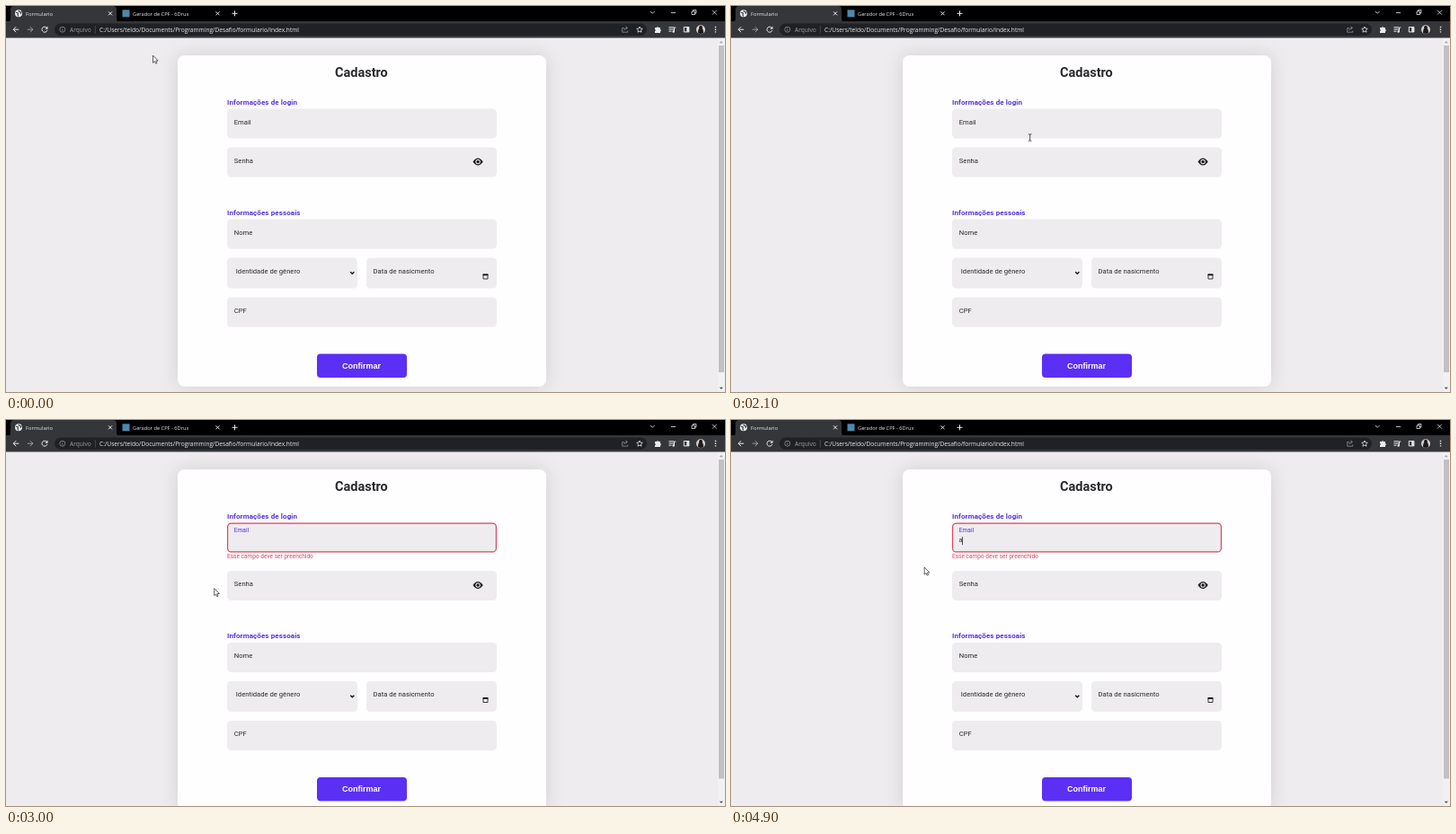
An HTML page for the animation above (5000 ms loop, 800 px wide and 430 px high).

```html
<!DOCTYPE html>
<html lang="pt">
<head>
<meta charset="utf-8">
<title>Formulario</title>
<style>
html, body { margin: 0; width: 100%; height: 100%; overflow: hidden; background: #eeecee }
svg { display: block; font: 7.65px Roboto, sans-serif; fill: #2b292d }
.field { fill: #eeecee }
.head { font-weight: 700; font-size: 8px; letter-spacing: .1px; fill: #5530e0 }
.ui { font-family: "Open Sans", sans-serif; fill: #e8eaed }
.line { fill: none; stroke: #e8eaed; stroke-width: 1 }
.thin { stroke-width: .8 }
.dim { fill: #9aa0a6 }
</style>
</head>
<body>
<svg width="800" height="430" viewBox="0 0 800 430">
  <filter id="shade" x="-20%" y="-20%" width="140%" height="140%">
    <feDropShadow dx="0" dy="0" stdDeviation="10" flood-color="#000" flood-opacity=".13"/>
  </filter>
  <rect width="800" height="430" fill="#eeecee"/>
  <rect id="card" x="191" y="55" width="410" height="369" rx="8" fill="#fefdff" filter="url(#shade)"/>
  <text x="366" y="79" font-size="14.5" font-weight="700">Cadastro</text>

  <text class="head" x="246" y="109.5">Informações de login</text>
  <rect class="field" x="246" y="114.5" width="300" height="33" rx="4.5"/>
  <rect id="border" x="246.6" y="115.1" width="298.8" height="31.8" rx="4" fill="none" stroke-width="1.2"/>
  <text id="email" x="253.8">Email</text>
  <text id="typed" x="253.8" y="136.3" font-family="Liberation Sans, Arial, sans-serif" font-size="6.7">a</text>
  <rect id="caret" y="130" width=".8" height="9"/>
  <text id="error" x="246" y="154.3" font-size="6.55" fill="#d8495d">Esse campo deve ser preenchido</text>

  <g id="rest">
    <rect class="field" x="246" y="157.5" width="300" height="33" rx="4.5"/>
    <text x="253.8" y="174.6">Senha</text>
    <path d="M519.5 173.5Q525 165.700 530.800 173.500Q525 181.300 519.500 173.500Z" fill="#1c1b1e"/>
    <circle cx="525.1" cy="173.500" r="2.700" fill="#eeecee"/>
    <circle cx="525.1" cy="173.500" r="1.700" fill="#1c1b1e"/>

    <text class="head" x="246" y="232.600">Informações pessoais</text>
    <rect class="field" x="246" y="237.500" width="300" height="33" rx="4.500"/>
    <text x="253.800" y="254.600">Nome</text>
    <rect class="field" x="246" y="280.500" width="145" height="34" rx="4.500"/>
    <text x="255.800" y="297.600">Identidade de gênero</text>
    <path d="M383.200 296.200l2.100 2.100 2.100-2.100" fill="none" stroke="#111" stroke-width="1.300"/>
    <rect class="field" x="401" y="280.500" width="145" height="34" rx="4.500"/>
    <text x="408.600" y="297.600">Data de nasicmento</text>
    <path d="M531 299.200h5v4.800h-5z" fill="none" stroke="#111" stroke-width=".8"/>
    <path d="M530.600 298.500h5.800v1.800h-5.800z" fill="#111"/>
    <rect class="field" x="246" y="324.500" width="300" height="33" rx="4.500"/>
    <text x="253.800" y="341.600">CPF</text>
    <rect x="346" y="387.500" width="100" height="26.500" rx="4" fill="#5b2ff4"/>
    <text x="374" y="403.800" font-family="Liberation Sans, Arial, sans-serif" font-size="9" font-weight="700" fill="#fff">Confirmar</text>
  </g>

  <rect x="792" y="35" width="8" height="395" fill="#f1f1f1"/>
  <rect id="thumb" x="793" y="44" width="6" fill="#c1c1c1"/>
  <path d="M793.700 41.200l2.100-2.200 2.100 2.200z" fill="#a3a3a3"/>
  <path d="M793.700 424.800l2.100 2.200 2.100-2.200z" fill="#505050"/>

  <g class="ui">
    <rect width="800" height="18" fill="#000"/>
    <rect y="17" width="800" height="18.500" fill="#35363a"/>
    <path d="M2 17.500Q5 17.500 5 14V4Q5 0 9 0H119Q123 0 123 4V14Q123 17.500 126 17.500Z" fill="#35363a"/>
    <rect x="54" y="19.500" width="659" height="13.500" rx="6.700" fill="#202124"/>

    <circle cx="14" cy="8.300" r="4"/>
    <path d="M11 7l2.500 1-.5 2 1 1.500M14 5l1 1.500 2 .3-1 2" fill="none" stroke="#35363a" stroke-width="1.100"/>
    <text x="22" y="10.600" font-size="5.850">Formulario</text>
    <rect x="129.500" y="4.300" width="8" height="8" fill="#4b8aad"/>
    <text x="141" y="10.600" font-size="5.700">Gerador de CPF - 6Drux</text>
    <path class="line" d="M114 6.300l4 4m0-4l-4 4M233.500 6.300l4 4m0-4l-4 4M254.500 5.300v6m-3-3h6"/>
    <path class="line thin" d="M717 6l2.300 2.300L721.600 6M740 7.500h5M763 6h3.500v3.500H763zM764.500 6V4.500h3.500V8h-1.500M786 4.800l4.800 4.800m0-4.800l-4.800 4.800"/>

    <path class="line" d="M14.300 26.200H8.200m3-3l-3 3 3 3"/>
    <path class="line" stroke-opacity=".55" d="M23.800 26.200h6m-3-3l3 3-3 3"/>
    <path class="line" d="M45.500 24.500a3 3 0 1 0 .4 2.500"/>
    <path d="M46.500 22.500v3.200h-3.200z"/>
    <g stroke="#9aa0a6" stroke-width=".7" fill="none">
      <circle cx="62.800" cy="26.200" r="3"/>
      <path d="M62.800 25.700v2.200m0-3.500v.7"/>
      <path d="M688 24.500h-2.300v4.700h6v-1.700M687.500 27.200q.5-2.600 3.500-2.800m-1.500-1.600l2 1.600-2 1.700"/>
    </g>
    <text class="dim" x="71" y="28.700" font-size="6.600">Arquivo</text>
    <path d="M99.300 22v8.500" stroke="#5f6368" stroke-width=".6"/>
    <text x="104" y="28.700" font-size="6.600">C:/Users/teldo/Documents/Programming/Desafio/formulario/index.html</text>

    <path class="line thin" d="M705 23l.95 2.100 2.300.2-1.700 1.600.5 2.300-2.050-1.200-2.050 1.200.5-2.300-1.700-1.600 2.300-.2z"/>
    <path d="M722 24h1.900a1.200 1.200 0 0 1 2.300 0h1.800v2a1.200 1.200 0 0 1 0 2.300v1.700h-6v-2a1.100 1.100 0 0 0 0-2.100z"/>
    <path class="line" d="M737.500 23.800h5.500M737.500 26h5.500M737.500 28.200h3M743.500 28.500v-4.500h1.800"/>
    <circle cx="742.700" cy="28.500" r="1.200"/>
    <path class="line" d="M754.300 23.500h5.600v5.400h-5.600z"/>
    <path d="M757.300 23.500h2.600v5.400h-2.600z"/>
    <circle cx="773" cy="26.200" r="5" fill="#d6cfcd"/>
    <path d="M770 30.100Q770 26 771.300 25a2 2 0 1 1 3.400 0Q776 26 776 30.100Q773 32 770 30.100Z" fill="#1d1a1c"/>
    <path d="M788.800 22.800h1.400v1.400h-1.400zM788.800 25.500h1.400v1.400h-1.400zM788.800 28.200h1.400v1.400h-1.400z"/>
  </g>

  <path id="arrow" d="M0 0V8.200L1.900 6.500 3.100 9.200 4.400 8.600 3.200 6H5.700Z" fill="#fff" stroke="#222" stroke-width=".7"/>
  <path id="beam" d="M-1.800-3.700H-.5L0-3.300.5-3.700H1.800M0-3.300V3.300M-1.800 3.700H-.5L0 3.300.5 3.700H1.800" fill="none" stroke="#222" stroke-width=".8"/>
</svg>
<script>
const $ = id => document.getElementById(id);
const set = (id, attrs) => { for (const k in attrs) $(id).setAttribute(k, attrs[k]); };
const show = (id, on) => set(id, { visibility: on ? 'visible' : 'hidden' });
const mix = (a, b, p) => a + (b - a) * p;
const ramp = (t, a, b) => Math.min(1, Math.max(0, (t - a) / (b - a)));

// time, x, y of the pointer
const path = [
  [0, 163.5, 55], [1800, 163.5, 55], [2100, 332.7, 146.5], [2500, 332.7, 146.5],
  [2900, 231.7, 187.5], [3500, 231.7, 187.5], [3800, 275.5, 135.5],
  [4400, 275.5, 135.5], [4700, 232.3, 158], [4900, 215.2, 164], [5000, 215.2, 164]
];

function pointer(t) {
  const i = path.findIndex(p => p[0] > t);
  const [t0, x0, y0] = path[i - 1], [t1, x1, y1] = path[i];
  const p = ramp(t, t0, t1), x = mix(x0, x1, p), y = mix(y0, y1, p);
  const inField = x > 246 && x < 546 && (y > 114 && y < 148 || y > 157 && y < 190);
  const transform = `translate(${x} ${y})`;
  set('arrow', { transform });
  set('beam', { transform });
  show('arrow', !inField);
  show('beam', inField);
}

function draw(t) {
  const failed = t >= 3000, typed = t >= 4600;
  const lift = ramp(t, 2400, 2700) - ramp(t, 3000, 3300) + ramp(t, 4100, 4400);
  const tint = Math.min(1, lift * 2);
  const rgb = [[43, 85], [41, 48], [45, 224]].map(([a, b]) => Math.round(mix(a, b, tint)));

  set('email', { y: mix(131.6, 125.2, lift), 'font-size': mix(7.6, 6.6, lift), fill: `rgb(${rgb})` });
  set('border', { stroke: failed ? '#d8495d' : '#5a35d8' });
  show('border', t >= 2400);
  show('error', failed);
  show('typed', typed);
  set('caret', { x: typed ? 257.2 : 253.8 });
  show('caret', t >= 2400 && t < 2900 || t >= 4200);

  const drop = failed ? 10.5 : 0;
  set('rest', { transform: `translate(0 ${drop})` });
  set('card', { height: 369 + drop });
  set('thumb', { height: failed ? 355.5 : 364 });
  pointer(t);
}

function tick() {
  draw(Math.floor(performance.now() % 5000 / 100) * 100);
  requestAnimationFrame(tick);
}
tick();
</script>
</body>
</html>
```
